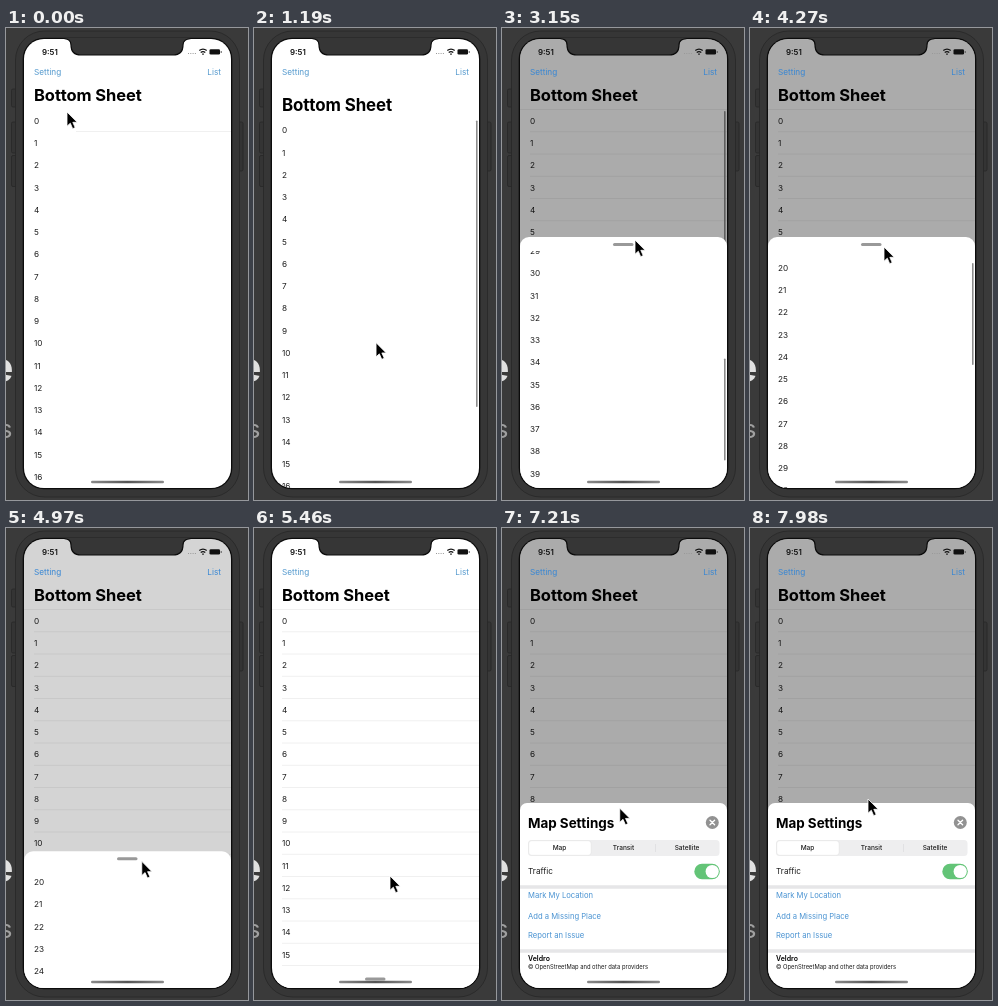
Animation of 242x472 px, one loop 8000 ms. Source, as an HTML page:

```html
<!DOCTYPE html>
<html lang="en">
<head>
<meta charset="utf-8">
<title>Bottom Sheet</title>
<style>
html, body { margin: 0; width: 100%; height: 100%; overflow: hidden; background: #3a3a3a; }
svg { display: block; width: 100vw; height: 100vh; font-family: Inter, Roboto, sans-serif; font-size: 8.2px; fill: #1c1c1c; }
.bold { font-weight: 700; fill: #000; }
.link { fill: #4a93d2; }
.line { stroke: #ececec; stroke-width: .8; }
.bar { fill: #8c8c8c; }
</style>
</head>
<body>
<svg viewBox="0 0 242 472">
  <defs>
    <clipPath id="screen"><rect x="18" y="11" width="207" height="449" rx="20"/></clipPath>
    <clipPath id="listArea"><rect x="18" y="14" width="207" height="240"/></clipPath>
    <linearGradient id="home"><stop stop-color="#8a8a8a"/><stop offset=".5" stop-color="#555"/><stop offset="1" stop-color="#8a8a8a"/></linearGradient>
  </defs>

  <rect width="242" height="472" fill="#3a3a3a"/>
  <text x="-17" y="353.500" font-size="41" font-weight="700" fill="#e0e0e0">e</text>
  <text x="-7" y="410" font-size="25.500" fill="#a0a0a0">s</text>
  <g fill="#343434" stroke="#282828" stroke-width=".8">
    <rect x="5.500" y="61" width="6" height="18" rx="1.500"/>
    <rect x="5.500" y="94" width="6" height="31" rx="1.500"/>
    <rect x="5.500" y="127.500" width="6" height="31" rx="1.500"/>
    <rect x="231" y="94" width="6" height="49" rx="1.500"/>
    <rect x="9.500" y="3" width="224" height="466" rx="29" fill="#363636"/>
  </g>
  <rect x="17.500" y="10.500" width="208" height="450" rx="20.500" fill="none" stroke="#0c0c0c" stroke-width="1.600"/>

  <g clip-path="url(#screen)">
    <rect x="18" y="11" width="207" height="449" fill="#fff"/>
    <g id="main">
      <text id="title" class="bold" font-size="16.500" letter-spacing="-.08">Bottom Sheet</text>
      <g id="rows"></g>
      <g id="lines"></g>
      <path id="firstLine" class="line" d="M70 103.500H225"/>
    </g>
    <rect id="mainBar" class="bar" x="222" width="1.600" rx=".8"/>
    <rect id="dim" x="18" y="11" width="207" height="449" fill="#000"/>

    <text x="36" y="26.500" font-size="7.900" font-weight="600" fill="#111">9:51</text>
    <path d="M182 25.500h8" stroke="#999" stroke-width="1" stroke-dasharray="1 1.300"/>
    <g fill="none" stroke="#111" stroke-width="1.300">
      <path d="M193.300 22.600q3.700-3 7.400 0M194.700 24.500q2.300-1.800 4.600 0"/>
      <path d="M196.200 26.100h1.600"/>
    </g>
    <rect x="203.500" y="21.300" width="10.500" height="5.200" rx="1.300" fill="#111"/>
    <path d="M215.200 23v2" stroke="#555" stroke-width="1"/>

    <text id="setting" class="link" x="28" y="47.300">Setting</text>
    <text id="list" class="link" x="201.300" y="47.300">List</text>

    <g id="listSheet">
      <rect x="18" width="207" height="290" rx="9" fill="#fff"/>
      <g clip-path="url(#listArea)"><g id="sheetRows"></g></g>
      <rect x="111" y="6" width="20.500" height="3" rx="1.500" fill="#999"/>
      <rect id="sheetBar" class="bar" x="222" width="1.600" height="102" rx=".8"/>
    </g>

    <g id="mapSheet">
      <rect x="18" width="207" height="230" rx="7" fill="#fff"/>
      <text class="bold" x="26" y="24.700" font-size="13.400">Map Settings</text>
      <circle cx="210.300" cy="19.500" r="6.500" fill="#929292"/>
      <path d="M208 17.200l4.600 4.600m0-4.600l-4.600 4.600" stroke="#fff" stroke-width="1.300" stroke-linecap="round"/>
      <rect x="26" y="37" width="191.500" height="16" rx="3.500" fill="#eeeeef"/>
      <rect x="26.700" y="37.700" width="62.500" height="14.600" rx="3" fill="#fff" stroke="#ddd" stroke-width=".5"/>
      <path d="M153.500 41v8" stroke="#d8d8da" stroke-width=".6"/>
      <g text-anchor="middle" font-size="6.500" font-weight="500">
        <text x="57.500" y="47.300">Map</text>
        <text x="121.500" y="47.300">Transit</text>
        <text x="185" y="47.300">Satellite</text>
      </g>
      <text x="26" y="71.200">Traffic</text>
      <rect x="192.300" y="60.800" width="25.500" height="15.400" rx="7.700" fill="#63c477"/>
      <circle cx="210.200" cy="68.500" r="6.600" fill="#fff"/>
      <path d="M18 84H225M18 148H225" stroke="#e6e6e8" stroke-width="3.500"/>
      <g class="link" font-size="7.650">
        <text x="26" y="95.300">Mark My Location</text>
        <text x="26" y="115.500">Add a Missing Place</text>
        <text x="26" y="135.300">Report an Issue</text>
      </g>
      <text class="bold" x="26" y="158" font-size="7" style="font-weight:600">Veldro</text>
      <text x="26" y="165.600" font-size="5.850">© OpenStreetMap and other data providers</text>
    </g>

    <rect x="85" y="452.700" width="73" height="2.600" rx="1.300" fill="url(#home)"/>
  </g>

  <path d="M58 10H185V11Q177 11 177 17Q177 27 167 27H75Q65 27 65 17Q65 11 58 11Z" fill="#363636"/>
  <path d="M58 10.500Q65 11 65 17Q65 27 75 27H167Q177 27 177 17Q177 11 185 10.500" fill="none" stroke="#0c0c0c" stroke-width="1.200"/>
  <path id="cursor" d="M0 0V14.200L3.300 11.200L5.700 16.700L8.200 15.600L5.800 10.300H10.200Z" fill="#000" stroke="#fff" stroke-width=".8"/>
</svg>
<script>
const LOOP = 8000, STEP = 70, PITCH = 22.25, ROWS = 20;
const SCROLL_MAX = 217, DIM = .33, HIDDEN = 475;

const $ = id => document.getElementById(id);
const set = (id, name, value) => $(id).setAttribute(name, value);
const move = (id, x, y) => set(id, 'transform', `translate(${x} ${y})`);
const fade = (id, value) => set(id, 'opacity', value);

const clamp = k => Math.min(1, Math.max(0, k));
const linear = k => k;
const smooth = k => k * k * (3 - 2 * k);
const outCubic = k => 1 - (1 - k) ** 3;
const ramp = (t, from, to, ease = smooth) => ease(clamp((t - from) / (to - from)));
const pulse = (t, from, to, edge) => ramp(t, from, from + edge) - ramp(t, to, to + edge);

// Places the pointer visits: arrival time, x, y and an optional rest.
const stops = [
  [0, 61, 84],
  [1330, 124, 322],
  [1960, 203, 42, 190],
  [2590, 130, 330],
  [2870, 132, 111],
  [3150, 133, 212],
  [3850, 135, 430],
  [4270, 134, 219, 210],
  [5100, 136, 348, 360],
  [5860, 42, 43, 160],
  [6440, 110, 131],
  [6790, 99, 208],
  [7560, 132, 335],
  [7980, 118, 271]
];

function pointer(t) {
  let [x, y] = stops[0].slice(1);
  for (let i = 1; i < stops.length; i++) {
    const [t0, , , rest = 0] = stops[i - 1], [t1, x1, y1] = stops[i];
    const k = ramp(t, t0 + rest, t1);
    x += (x1 - x) * k;
    y += (y1 - y) * k;
  }
  return [x, y];
}

function addRows(id, first, y) {
  for (let i = 0; i < ROWS; i++) {
    $(id).insertAdjacentHTML('beforeend', `<text x="28" y="${y + i * PITCH}">${first + i}</text>`);
  }
}
addRows('rows', 0, 95.8);
addRows('sheetRows', ROWS, 33.8);
for (let i = 0; i < ROWS; i++) {
  $('lines').insertAdjacentHTML('beforeend', `<path class="line" d="M${i ? 28 : 18} ${81.5 + i * PITCH}H225"/>`);
}

function draw(t) {
  // Rubber-band pull on the main list, and the scroll inside the sheet.
  const pull = 17 * Math.sin(Math.PI * ramp(t, 960, 2170, linear));
  const scroll = SCROLL_MAX * (ramp(t, 2590, 2870) - ramp(t, 3430, 3850));

  // Each sheet rises; the list sheet is then dragged down and let go.
  const listTop = HIDDEN - 266 * ramp(t, 2150, 2520, outCubic)
    + 129 * ramp(t, 4480, 5100) + 137 * ramp(t, 5100, 5567, linear);
  const mapTop = HIDDEN - 200 * ramp(t, 6090, 6675, outCubic);
  const dim = DIM * Math.max(ramp(listTop, 443, 209, linear), ramp(mapTop, HIDDEN, 275, linear));

  move('main', 0, pull);
  set('title', 'transform', `translate(28 73.4) scale(${1 + pull * .0025})`);
  fade('lines', t < 2150 ? 0 : 1);
  fade('firstLine', t < 900 ? 1 : 0);
  set('mainBar', 'y', 83 + pull);
  set('mainBar', 'height', 296 - pull);
  fade('mainBar', pulse(t, 960, 3430, 200));
  fade('dim', dim);

  $('setting').style.fill = $('list').style.fill = dim > .1 ? '#3686d4' : '#5298cd';
  fade('list', 1 - .45 * pulse(t, 1950, 2150, 60));
  fade('setting', 1 - .65 * pulse(t, 5940, 6450, 100));

  move('listSheet', 0, listTop);
  move('sheetRows', 0, -scroll);
  set('sheetBar', 'y', 26 + scroll * .44);
  fade('sheetBar', pulse(t, 2590, 4400, 200));
  move('mapSheet', 0, mapTop);
  move('cursor', ...pointer(t));
}

function tick(now) {
  draw(Math.floor(now % LOOP / STEP) * STEP);
  requestAnimationFrame(tick);
}
draw(0);
requestAnimationFrame(tick);
</script>
</body>
</html>
```
